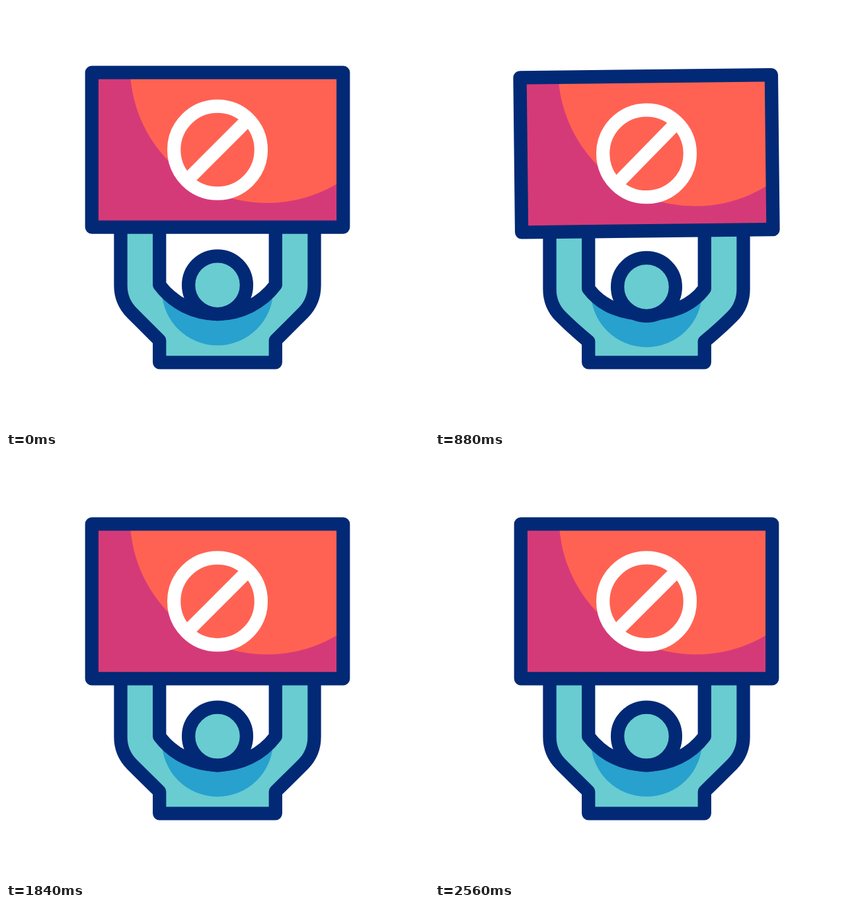
Recreate the animation shown at these times as an HTML page without scripts. Size 640x640 px, loop 2600 ms.

```html
<!DOCTYPE html>
<html lang="en">
<head>
<meta charset="utf-8">
<title>Protester with a sign</title>
<style>
  html, body { margin: 0; width: 100%; height: 100%; overflow: hidden; background: #fff; }
  svg { display: block; width: 100%; height: 100%; }

  .line { stroke: #022975; stroke-width: 20.3; stroke-linejoin: round; }
  .skin { fill: #68ccd1; }
  .shade { fill: #28a1ce; }
  .frame { x: 129.8px; y: 100.6px; width: 380.4px; height: 234px; }

  .bob {
    --drop: 0px;
    animation: bob 2600ms cubic-bezier(.3333, 0, .6667, 1) infinite;
  }
  .head { --drop: 12.8px; }
  .sign {
    --drop: 26.67px;
    transform-origin: 320px 217.6px;
    animation-name: bob, tilt;
  }

  /* Curve handles stay the same in both poses; only the joints move. */
  .body {
    --rest: path("M173.5 300v123c0 15.5 6.2 30.5 17.2 41.5c18 18 41.5 41.5 41.5 41.5v33.3h175.6v-33.3c0 0 23.5-23.5 41.5-41.5c11-11 17.2-26 17.2-41.5v-123z");
    --low: path("M173.5 300v149.7c0 15.5 6.2 30.5 17.2 41.5c18 18 41.5 22.3 41.5 22.3v25.8h175.6v-25.8c0 0 23.5-4.3 41.5-22.3c11-11 17.2-26 17.2-41.5v-149.7z");
  }
  .neck {
    --rest: path("M232.2 300v122c20.7 27.6 53.3 44 87.8 44s67.1-16.4 87.8-44v-122z");
    --low: path("M232.2 300v148.7c20.7 27.6 53.3 17.3 87.8 17.3s67.1 10.3 87.8-17.3v-148.7z");
  }

  /* A rest of 200 ms, then three dips of 800 ms. */
  @keyframes bob {
    0%, 7.6923%, 38.4615%, 69.2308%, 100% { translate: 0 0; d: var(--rest); }
    23.0769%, 53.8462%, 84.6154% { translate: 0 var(--drop); d: var(--low); }
  }
  @keyframes tilt {
    0%, 7.6923%, 38.4615%, 69.2308%, 100% { rotate: 0deg; }
    23.0769% { rotate: -3deg; }
    53.8462% { rotate: 3deg; }
  }
</style>
</head>
<body>
<svg viewBox="0 0 640 640">
  <clipPath id="panel"><rect class="frame"/></clipPath>

  <path class="bob body line skin"/>
  <circle class="bob head shade" cx="320" cy="429.2" r="84.3"/>
  <path class="bob neck line" fill="#fff"/>
  <circle class="bob head line skin" cx="320" cy="422.2" r="43.9"/>

  <g class="bob sign">
    <rect class="frame" fill="#d53a78"/>
    <circle cx="395" cy="90.5" r="207.5" fill="#ff6252" clip-path="url(#panel)"/>
    <rect class="frame line" fill="none"/>
    <g fill="none" stroke="#fff" stroke-width="20.3">
      <circle cx="320" cy="217.6" r="65.9"/>
      <path d="M273.4 264.2l93.2-93.2"/>
    </g>
  </g>
</svg>
</body>
</html>
```
